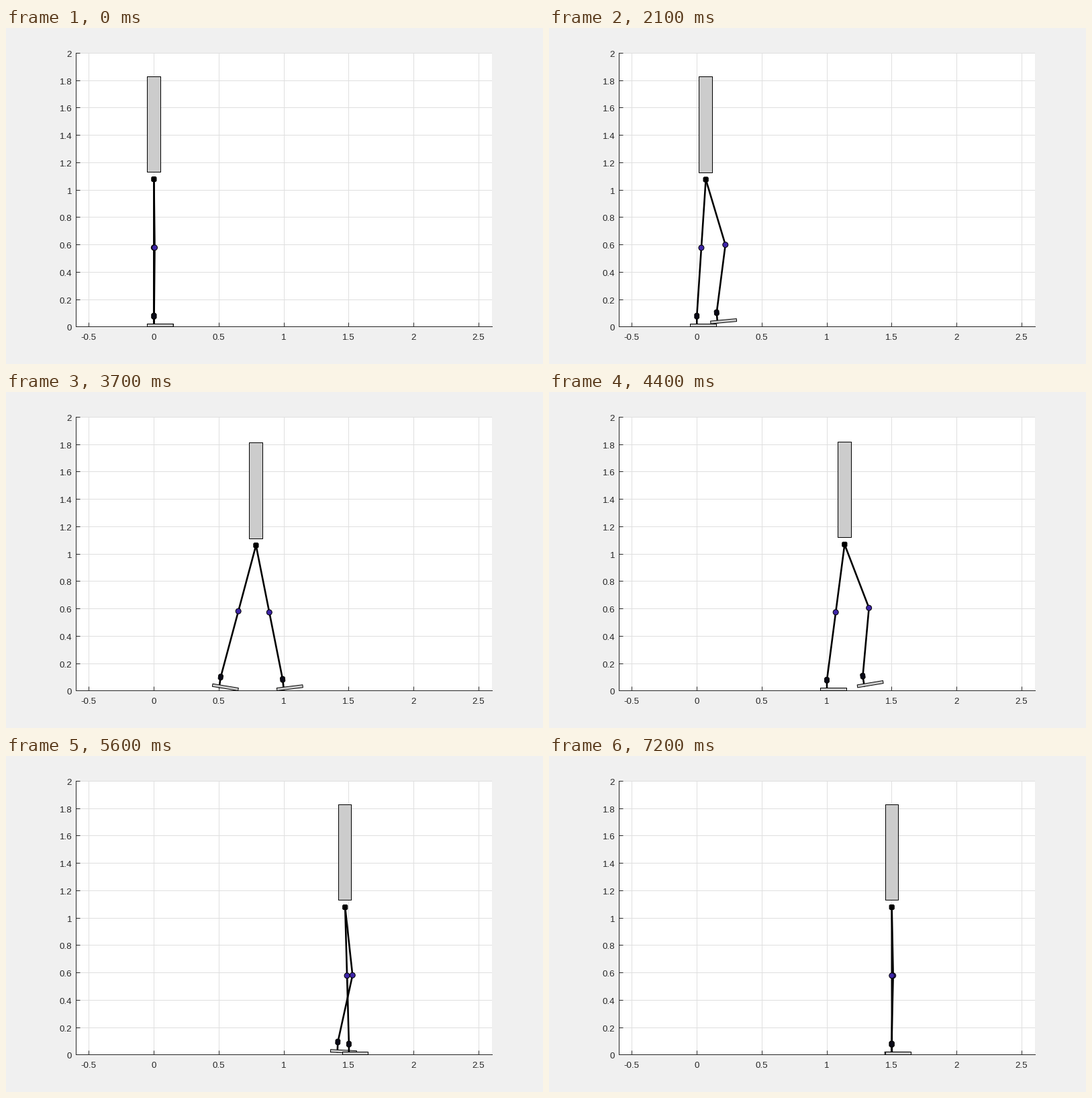
A matplotlib script for the animation above (7.5 s loop, 800x500 px).

```python
import numpy as np
import matplotlib.pyplot as plt
from matplotlib.animation import FuncAnimation
from matplotlib.patches import Ellipse, Polygon
from matplotlib.transforms import ScaledTranslation

DPI = 100
PX = 72 / DPI                      # one pixel in points
UNIT = np.array([193.75, 203.75])  # pixels per data unit
SNAP = np.array([-0.49, 0.51])     # moves hairlines to the pixel below
NUDGE = -SNAP / UNIT               # puts smooth lines back in place

LEG = 1.0
ANKLE = 0.08
HEEL, TOE, SOLE = -0.05, 0.15, 0.02
STEP, GOAL = 0.5, 1.5
LIFT = 0.03
PITCH = 0.27
ROLL = 0.122                       # hip travel while a foot rolls on the floor
PASS = np.array([-0.162, 0.216])   # hip range of a swing around the stance foot

# Inverted pendulum gait
RATE = 2.12
START = 2.707                      # hip leaves the first stance
PERIOD = 0.94
END = START + 2 * PERIOD


def hip_x(t):
    """Exponential start and stop, a sinh arc over each stance foot between."""
    if t < START:
        return STEP / 2 * np.exp(RATE * (t - START))
    if t >= END:
        return GOAL - STEP / 2 * np.exp(RATE * (END - t))
    n, u = divmod(t - START, PERIOD)
    swing = np.sinh(RATE * (u - PERIOD / 2)) / np.sinh(RATE * PERIOD / 2)
    return (n + 1) * STEP + STEP / 2 * swing


def rotate(points, a):
    c, s = np.cos(a), np.sin(a)
    return np.asarray(points) @ np.array([[c, s], [-s, c]])


def contact(x, a):
    """Foot base when the foot rolls over its toe or heel."""
    off = TOE if a < 0 else HEEL
    return np.array([x + off, 0]) - rotate([off, 0], a)


def foot_pose(centers, h):
    """Base, pitch and floor contact of a foot that swings past each center."""
    x, pitch = 0, 0
    for c in centers:
        x0, x1 = np.clip([c - STEP, c + STEP], 0, GOAL)
        off, on = np.clip(c + PASS, 0, GOAL)
        a0, a1 = -PITCH * (off > 0), PITCH * (on < GOAL)
        pitch += np.interp(h, [off - ROLL, off, on, on + ROLL], [0, a0, a1, 0])
        if off <= h < on:
            s = (h - off) / (on - off)
            base = (1 - s) * contact(x0, a0) + s * contact(x1, a1)
            return base + [0, LIFT * np.sin(np.pi * s) ** 2], pitch, False
        if h >= on:
            x = x1
    return contact(x, pitch), pitch, True


def knee_pos(hip, ankle, straight):
    d = hip - ankle
    n = np.hypot(*d)
    bend = 0 if straight else np.sqrt(max(LEG ** 2 - n * n, 0)) / 2
    return (hip + ankle) / 2 + bend * np.array([d[1], -d[0]]) / n


def chamfer(w, h, cut):
    """Octagon of half size w, h in pixels, as data offsets."""
    corner = np.array([(w - cut, h), (w, h - cut)])
    half = np.vstack([corner, corner[::-1] * [1, -1]])
    return np.vstack([half, -half]) / UNIT


def box(x0, x1, y0, y1):
    return np.array([(x0, y0), (x1, y0), (x1, y1), (x0, y1)])


HIP_SHAPE = chamfer(3.6, 3.6, 1.2)
ANKLE_SHAPE = chamfer(3.4, 4.2, 1.6)
FOOT_SHAPE = box(HEEL, TOE, 0, SOLE)
TORSO_SHAPE = box(-0.05, 0.05, 0.05, 0.75)

plt.rcParams["font.family"] = "Liberation Sans"
fig = plt.figure(figsize=(8, 5), dpi=DPI, facecolor="#f0f0f0")
left, bottom = (np.array([104, 55]) + SNAP) / [800, 500]
ax = fig.add_axes([left, bottom, 0.775, 0.815])
ax.set(xlim=(-0.6, 2.6), ylim=(0, 2))
ax.set_axisbelow(True)
xt, yt = np.arange(-0.5, 2.6, 0.5), np.arange(11) / 5
ax.set_xticks(xt, [f"{v:g}" for v in xt])
ax.set_yticks(yt, [f"{v:g}" for v in yt])
ax.grid(color="#dfdfdf", lw=PX)
ax.tick_params(direction="in", length=6.2 * PX, width=PX, color="#262626",
               labelcolor="#262626", labelsize=13.33 * PX)
ax.tick_params(axis="x", pad=10.2 * PX)
ax.tick_params(axis="y", pad=5.3 * PX)
drop = ScaledTranslation(0, -1.5 / DPI, fig.dpi_scale_trans)
for label in ax.get_yticklabels():
    label.set_transform(label.get_transform() + drop)
for side in ("top", "right"):
    ax.spines[side].set_visible(False)
for side in ("left", "bottom"):
    ax.spines[side].set(color="#262626", linewidth=PX)


def add_shape(color, z):
    shape = Polygon(np.zeros((4, 2)), closed=True, fc=color, ec="black", lw=PX,
                    joinstyle="round", zorder=z, clip_on=False)
    return ax.add_patch(shape)


def add_leg(z):
    line, = ax.plot([], [], color="black", lw=2.6 * PX, zorder=z,
                    solid_joinstyle="round", solid_capstyle="butt")
    knee = Ellipse((0, 0), *(8 / UNIT), fc="#3e26a8", ec="black", lw=PX, zorder=z + 2)
    ax.add_patch(knee)
    return dict(line=line, knee=knee, foot=add_shape("#cccccc", z + 1),
                ankle=add_shape("#0a0a18", z + 2))


# The left foot swings past the right one at odd steps, the right at even ones
legs = [((STEP, 3 * STEP), add_leg(4)), ((0, 2 * STEP), add_leg(8))]
torso = add_shape("#cccccc", 12)
hip_mark = add_shape("black", 12)


def clock(i):
    """Seconds; the picture holds for two ticks while almost at rest."""
    if i < 6 or i >= 68:
        i -= i % 2
    return min(i, 72) / 10


def draw(i):
    h = hip_x(clock(i))
    poses = [foot_pose(centers, h) for centers, _ in legs]
    ankles = [base + rotate([0, ANKLE], a) for base, a, _ in poses]
    # The hip is as high as the straighter leg allows
    top = min(y + np.sqrt(max(LEG ** 2 - (h - x) ** 2, 0)) for x, y in ankles)
    hip = np.array([h, top])
    torso.set_xy(hip + TORSO_SHAPE)
    hip_mark.set_xy(hip + HIP_SHAPE + NUDGE)
    for (_, art), (base, a, grounded), ankle in zip(legs, poses, ankles):
        knee = knee_pos(hip, ankle, grounded)
        art["line"].set_data(*(np.array([hip, knee, ankle, base]) + NUDGE).T)
        art["knee"].set_center(knee + NUDGE)
        art["ankle"].set_xy(ankle + rotate(ANKLE_SHAPE, a) + NUDGE)
        art["foot"].set_xy(base + rotate(FOOT_SHAPE, a))
    return []


anim = FuncAnimation(fig, draw, frames=75, interval=100, repeat=True,
                     repeat_delay=0, init_func=lambda: draw(0))
plt.show()
```
